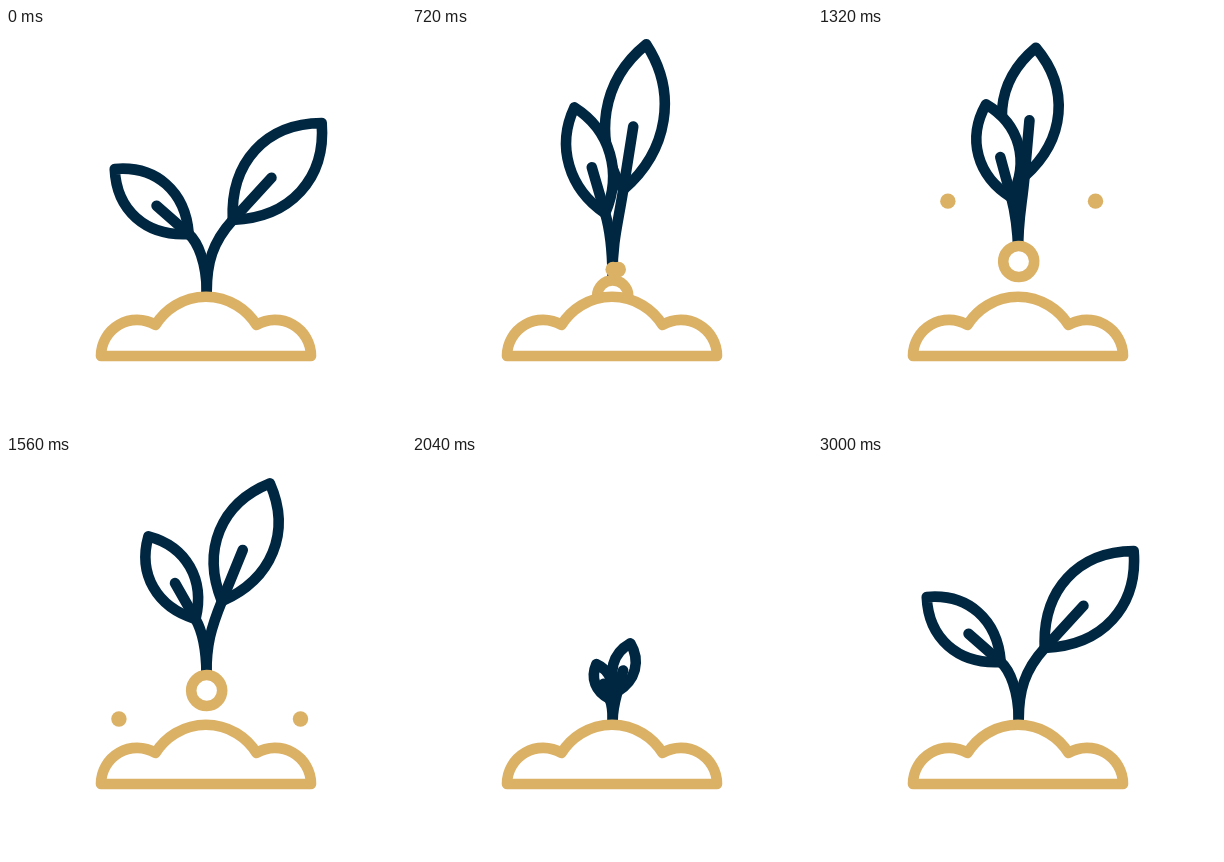
These frames come from a looping animation (400 by 400 pixels, 5630 ms). An HTML page:

```html
<!DOCTYPE html>
<html lang="en">
<head>
<meta charset="utf-8">
<title>Sprout</title>
<style>
  html, body { margin: 0; height: 100%; overflow: hidden; background: #fff; }
  svg { display: block; width: 100vw; height: 100vh; }
  path, #ring { fill: #fff; stroke-width: 10.6; stroke-linecap: round; stroke-linejoin: round; }
  #plants path { stroke: #002742; }
  #plants .stem { fill: none; }
  #ring, #mound { stroke: #dbb166; }
  .dot { fill: #dbb166; }
</style>
</head>
<body>
<svg viewBox="0 0 400 400">
  <g id="plants">
    <g id="seedling">
      <path/><path class="stem"/><path/><path class="stem"/>
    </g>
    <g id="flyer">
      <path/><path class="stem"/><path/><path class="stem"/>
      <circle id="ring" r="15.5"/>
    </g>
  </g>
  <circle class="dot"/>
  <circle class="dot"/>
  <path id="mound" d="M95 328A36 36 0 0 1 149.500 297A59.300 59.300 0 0 1 250.500 297A36 36 0 0 1 305 328Z"/>
</svg>
<script>
const LOOP = 5630, TAKEOFF = 1710, GONE = 1980, SPROUT = 1840, GROWN = 3000;
const seedling = document.getElementById('seedling');
const flyer = document.getElementById('flyer');
const dots = document.querySelectorAll('.dot');

const linear = p => p;
const easeOut = p => 1 - (1 - p) ** 2;
const easeInOut = p => p * p * (3 - 2 * p);
const mix = (a, b, p) => a + (b - a) * p;
const progress = (t, from, to) => Math.min(1, Math.max(0, (t - from) / (to - from)));
const bezier = (a, b, c, d, p) => {
  const q = 1 - p;
  return q * q * q * a + 3 * q * q * p * b + 3 * q * p * p * c + p * p * p * d;
};

// Angles in degrees from vertical; "sway" and "sink" tell how folding moves the leaf base.
const leaves = [
  { side: 1, reach: 76.6, sink: 0, angle: 19.9, sway: .37, tilt: 42.5, length: 131.6, half: 41, bend: 30 },
  { side: -1, reach: 60.7, sink: .16, angle: 17.2, sway: .33, tilt: 48.7, length: 98.5, half: 30, bend: 12 }
];

// Ring height, gap from ring to stem, plant scale, leaf fold and lean.
const poses = [
  { t: 0, v: [300, 36, 1, 0, 0] },
  { t: 570, v: [294, 31, 1.09, 30, 0], ease: easeInOut },
  { t: 720, v: [268, 21, 1.12, 33, -.5], ease: linear },
  { t: 900, v: [246, 16, 1.04, 35, -1], ease: linear },
  { t: 1140, v: [235, 12, .985, 35.5, -2], ease: easeOut },
  { t: 1320, v: [233.5, 10.5, .98, 35.5, -2], ease: linear },
  { t: TAKEOFF, v: [235, 20, .96, 12, 0], ease: easeInOut }
];

function poseAt(t) {
  const i = poses.findIndex(pose => pose.t > t);
  if (i < 0) return poses[poses.length - 1].v;
  const from = poses[i - 1], to = poses[i];
  const p = to.ease(progress(t, from.t, to.t));
  return from.v.map((value, k) => mix(value, to.v[k], p));
}

function leafPaths(leaf, rootY, scale, fold) {
  const angle = (leaf.angle - leaf.sway * fold) * Math.PI / 180;
  const tilt = (leaf.tilt - fold) * Math.PI / 180;
  const reach = (leaf.reach - leaf.sink * fold) * scale;
  const length = leaf.length * scale;
  const half = leaf.half * Math.min(1, scale) * (1 - .0018 * fold);
  const baseX = Math.sin(angle) * reach, baseY = rootY - Math.cos(angle) * reach;
  const at = (x, y) => `${(leaf.side * x).toFixed(2)} ${y.toFixed(2)} `;
  const local = (along, across) => at(
    baseX + Math.sin(tilt) * along - Math.cos(tilt) * across,
    baseY - Math.cos(tilt) * along - Math.sin(tilt) * across);
  const near = .31 * length, far = .71 * length;
  const outline = `M${local(0, 0)}C${local(near, half)}${local(far, half)}${local(length, 0)}` +
    `C${local(far, -half)}${local(near, -half)}${local(0, 0)}Z`;
  const stem = `M${at(0, rootY)}C${at(0, rootY - 29 * scale)}${local(-leaf.bend * scale, 0)}` +
    `${local(0, 0)}L${local(.435 * length, 0)}`;
  return [outline, stem];
}

function drawPlant(group, x, y, rotation, gap, scale, fold) {
  group.setAttribute('transform', `translate(${x} ${y}) rotate(${rotation})`);
  leaves.flatMap(leaf => leafPaths(leaf, -gap, scale, fold))
    .forEach((d, i) => group.children[i].setAttribute('d', d));
}

function drawDots(t) {
  const rise = easeOut(progress(t, 680, 1200));
  const fall = progress(t, 1200, 1590) ** 4;
  const spread = bezier(0, 0, 40, 73.6, rise) + 23.4 * fall;
  const y = bezier(260, 220, 172, 172, rise) + 124 * fall;
  const radius = t < 680 ? 0 : 7.7 * (1 - progress(t, 1570, 1620));
  dots.forEach((dot, i) => {
    dot.setAttribute('cx', 203.7 + (i ? spread : -spread));
    dot.setAttribute('cy', y);
    dot.setAttribute('r', radius);
  });
}

function draw(t) {
  const flying = t < GONE, growing = t >= SPROUT;
  flyer.style.display = flying ? '' : 'none';
  seedling.style.display = growing ? '' : 'none';
  if (flying) {
    const p = progress(t, TAKEOFF, GONE);
    const [y, gap, scale, fold, lean] = poseAt(t);
    drawPlant(flyer, 200.7 + 249 * p ** 4, y - 280 * p * p, lean + 50 * p ** 1.5, gap, scale, fold);
  }
  if (growing) {
    const left = (1 - progress(t, SPROUT, GROWN)) ** 2.5;
    drawPlant(seedling, 200.7, 300, 0, 36, 1 - left, 42.5 * left ** .9);
  }
  drawDots(t);
}

const start = performance.now();
function tick() {
  draw((performance.now() - start) % LOOP);
  requestAnimationFrame(tick);
}
tick();
</script>
</body>
</html>
```
